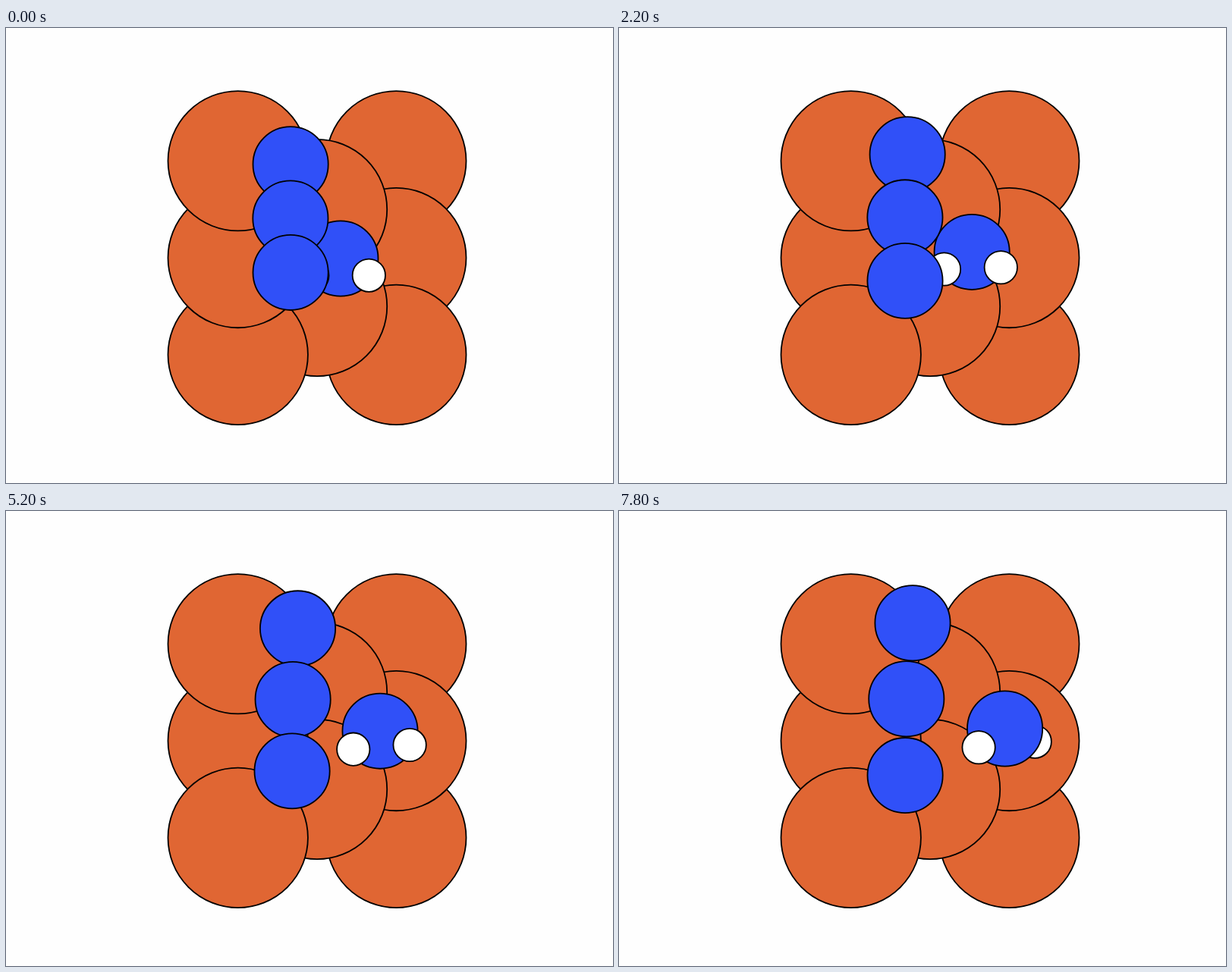
An HTML page with a canvas for the animation above (8000 ms loop, 800 by 600 pixels).

```html
<!DOCTYPE html>
<html lang="en">
<head>
<meta charset="utf-8">
<title>Atoms on a surface</title>
<style>
  html, body { margin: 0; width: 100%; height: 100%; overflow: hidden; background: #fefefe; }
  canvas { display: block; }
</style>
</head>
<body>
<canvas id="stage" width="800" height="600"></canvas>
<script>
const LOOP = 8000, STEP = 200, LAST = LOOP - STEP;
const TURN = 1600;            // the pull ends and the slow drift begins
const SWAP_METALS = 2000, HIDE_RIGHT = 7400;
const ctx = document.getElementById('stage').getContext('2d');

const kind = (radius, fill) => ({ r: radius * 69.85, fill });
const METAL = kind(1.32, '#e06633');
const NITRO = kind(0.71, '#3050f8');
const HYDRO = kind(0.31, '#ffffff');

// Lattice sites are counted from the middle of the slab.
const site = (col, row) => ({
  kind: METAL,
  at: () => [410 + col * 104.3, 303.05 + row * 127.8]
});

const settle = (u, rate) => (1 - Math.exp(-rate * u)) / (1 - Math.exp(-rate));
const mix = (a, b, u) => a + (b - a) * u;

// Moves from start to turn, then relaxes towards end.
const mover = (kind, start, turn, end) => ({
  kind,
  at(t) {
    const pulling = t < TURN;
    const u = pulling ? t / TURN : (t - TURN) / (LAST - TURN);
    const [from, to] = pulling ? [start, turn] : [turn, end];
    return [
      mix(from[0], to[0], pulling ? u : settle(u, 0.97)),
      mix(from[1], to[1], settle(u, 0.8))
    ];
  }
});

const atoms = {
  topLeft: site(-1, -1), midLeft: site(-1, 0), lowLeft: site(-1, 1),
  topRight: site(1, -1), midRight: site(1, 0), lowRight: site(1, 1),
  upper: site(0, -0.5), lower: site(0, 0.5),
  chainTop: mover(NITRO, [375.1, 179.7], [379, 169.6], [387, 147.7]),
  chainMid: mover(NITRO, [374.9, 251], [376.6, 250.2], [378.8, 247.7]),
  chainLow: mover(NITRO, [375.1, 322.4], [377, 331], [377.1, 348.6]),
  drifter: mover(NITRO, [440.9, 304], [457.8, 296.7], [508.6, 287]),
  hydroLeft: mover(HYDRO, [403.9, 326.5], [420.8, 319], [474.1, 311.8]),
  hydroRight: mover(HYDRO, [478.3, 326.2], [495.7, 317.6], [548.2, 304.2])
};

// Names from back to front.
function drawOrder(t) {
  const flipIf = (test, pair) => test ? pair.reverse() : pair;
  const swapped = t >= SWAP_METALS;
  return [
    'topRight', ...flipIf(swapped, ['midRight', 'lowRight']),
    'upper', 'lower',
    ...flipIf(swapped, ['lowLeft', 'midLeft']), 'topLeft',
    ...flipIf(t >= HIDE_RIGHT, ['drifter', 'hydroRight']),
    'hydroLeft', 'chainTop', 'chainMid', 'chainLow'
  ];
}

function draw(t) {
  ctx.fillStyle = '#fefefe';
  ctx.fillRect(0, 0, 800, 600);
  ctx.strokeStyle = '#000';
  ctx.lineWidth = 1.8;
  for (const name of drawOrder(t)) {
    const { kind, at } = atoms[name];
    ctx.beginPath();
    ctx.arc(...at(t), kind.r, 0, 2 * Math.PI);
    ctx.fillStyle = kind.fill;
    ctx.fill();
    ctx.stroke();
  }
}

const startTime = performance.now();
function tick() {
  const t = (performance.now() - startTime) % LOOP;
  draw(Math.floor(t / STEP) * STEP);
  requestAnimationFrame(tick);
}
tick();
</script>
</body>
</html>
```
